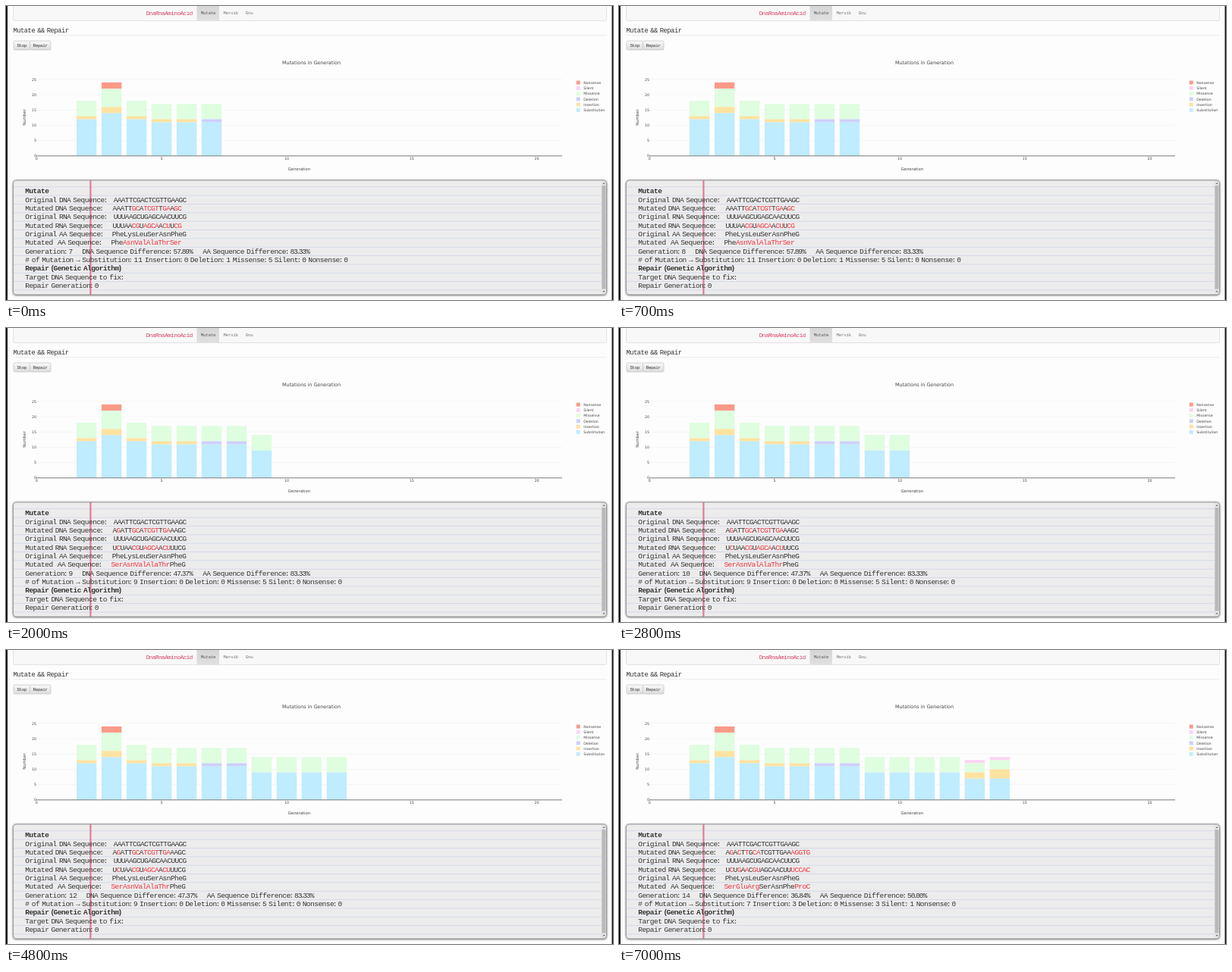
An HTML page that plays this animation: 800x388 px, repeating every 7.1 s.

```html
<!DOCTYPE html>
<html lang="en">
<head>
<meta charset="utf-8">
<title>Mutate and Repair</title>
<style>
html, body { margin: 0; width: 100%; height: 100%; overflow: hidden; background: #fdfdfd; }
svg { display: block; width: 800px; height: 388px; }
text { white-space: pre; }
.type { font-family: "Liberation Mono", monospace; text-anchor: middle; }
.plot { font-family: "DejaVu Sans", sans-serif; fill: #444; }
.red { fill: #f0323c; }
</style>
</head>
<body>
<svg id="stage" viewBox="0 0 800 388">
  <defs>
    <linearGradient id="button" x2="0" y2="1">
      <stop stop-color="#fafafa"/><stop offset="1" stop-color="#dcdcdc"/>
    </linearGradient>
    <linearGradient id="tab" x2="0" y2="1">
      <stop stop-color="#d6d6d6"/><stop offset="1" stop-color="#e0e0e0"/>
    </linearGradient>
    <filter id="shadow" x="-2%" y="-6%" width="104%" height="112%">
      <feDropShadow dx="0" dy="0.5" stdDeviation="1.6" flood-color="#000" flood-opacity=".75"/>
    </filter>
    <clipPath id="sheet"><rect x="9.5" y="230" width="782" height="151" rx="4"/></clipPath>
  </defs>
  <rect width="800" height="388" fill="#fdfdfd"/>
  <rect width="2" height="388" fill="#111"/>
  <rect x="798.5" width="1.5" height="388" fill="#111"/>

  <rect x="9.5" y="-5" width="782" height="24.5" rx="2" fill="#f8f8f8" stroke="#e2e2e2"/>
  <rect x="251.5" width="29.5" height="19" fill="url(#tab)"/>
  <rect x="9.5" y="38.3" width="782" height="1" fill="#ebebeb"/>
  <g fill="url(#button)" stroke="#c8c8c8" stroke-width=".8">
    <rect x="10" y="46" width="21.5" height="12" rx="1.5"/>
    <rect x="31.5" y="46" width="27.5" height="12" rx="1.5"/>
  </g>
  <g id="labels"></g>
  <g id="chart"></g>

  <rect x="9.5" y="230" width="782" height="151" rx="4" fill="#ececec" filter="url(#shadow)"/>
  <g clip-path="url(#sheet)">
    <g id="rules"></g>
    <rect x="110.3" y="230" width="2.2" height="151" fill="#df7d95"/>
    <rect x="784.6" y="230" width="7" height="151" fill="#e4e4e4"/>
    <rect x="785.3" y="237" width="5.2" height="136.5" fill="#b9b9b9"/>
    <path d="M786.3 235l1.7-2 1.7 2zM786.3 376l1.7 2 1.7-2z" fill="#777"/>
  </g>
  <rect x="9.5" y="230" width="782" height="151" rx="4" fill="none" stroke="#8a8a8a" stroke-width=".8"/>
  <g id="report"></g>
</svg>
<script>
const LOOP = 7100;
const FIRST = 7;
const CHANGES = [700, 1800, 2700, 3800, 4800, 5800, 6800];

const byId = id => document.getElementById(id);

function add(parent, tag, attrs = {}, text) {
  const node = document.createElementNS('http://www.w3.org/2000/svg', tag);
  for (const key in attrs) node.setAttribute(key, attrs[key]);
  if (text !== undefined) node.textContent = text;
  parent.appendChild(node);
  return node;
}

// Glyph advances of the typewriter face, at body size 9.5
function advance(ch) {
  if (ch === ' ') return 3.2;
  if (ch === ':') return 2.5;
  if (ch === '.') return 2;
  if (ch === '1') return 5.6;
  if ('()'.includes(ch)) return 3;
  if (/[0-9]/.test(ch)) return 4.6;
  return /[A-Z]/.test(ch) ? 5.05 : 5.2;
}

// Letters that differ from base at the same place become red
function type(parent, text, x, y, { size = 9.5, fill = '#333', bold, base } = {}) {
  const scale = size / 9.5;
  const centres = [...text].map(ch => {
    const w = advance(ch) * scale;
    x += w;
    return (x - w / 2).toFixed(2);
  });
  const node = add(parent, 'text', {
    class: 'type', x: centres.join(' '), y, fill,
    'font-size': size, 'font-weight': bold ? 700 : 400
  });
  if (!base) {
    node.textContent = text;
    return;
  }
  [...text].forEach((ch, i) => add(node, 'tspan', ch === base[i] ? {} : { class: 'red' }, ch));
}

function drawLabels() {
  const g = byId('labels');
  type(g, 'DnaRnaAminoAcid', 185, 11.6, { size: 7.5, fill: '#d63f62' });
  type(g, 'Mutate', 257, 11.2, { size: 5.9, fill: '#555' });
  type(g, 'Mervik', 286.8, 11.2, { size: 5.9, fill: '#777' });
  type(g, 'Gnu', 316, 11.2, { size: 5.9, fill: '#777' });
  type(g, 'Mutate && Repair', 9.7, 35.4, { size: 8.8 });
  type(g, 'Stop', 14.6, 53.7, { size: 5.8 });
  type(g, 'Repair', 35.8, 53.7, { size: 5.8 });
}

const SERIES = [
  ['Substitution', '#bfecfe'],
  ['Insertion', '#fee2a0'],
  ['Deletion', '#cdcffc'],
  ['Missense', '#dffddf'],
  ['Silent', '#fbd4f5'],
  ['Nonsense', '#fa9a88']
];
const UNIT = 4.035;
const FLOOR = 197.7;
const xAt = n => 40.2 + 32.97 * n;
const yAt = n => FLOOR - UNIT * n;

// Counts per generation from 2 on, in the order of SERIES
const COUNTS = [
  [12, 1, 0, 5], [14, 2, 0, 6, 0, 2], [12, 1, 0, 5],
  ...Array(2).fill([11, 1, 0, 5]),
  ...Array(2).fill([11, 0, 1, 5]),
  ...Array(4).fill([9, 0, 0, 5]),
  [7, 2, 0, 3, 1], [7, 3, 0, 3, 1]
];

function drawChart() {
  const g = byId('chart');
  const label = (text, x, y, size, anchor = 'middle', more = {}) =>
    add(g, 'text', { class: 'plot', x, y, 'font-size': size, 'text-anchor': anchor, ...more }, text);

  label('Mutations in Generation', 402.5, 77, 6.38);
  label('Generation', 386.3, 217.3, 5.3);
  label('Number', 26, 147, 5.3, 'middle', { transform: 'rotate(-90 26 147)' });
  for (let n = 0; n <= 25; n += 5) {
    if (n) add(g, 'rect', { x: 40, y: yAt(n) - .3, width: 693, height: .6, fill: '#f0f0f0' });
    label(n, 40, yAt(n) + 1.7, 4.75, 'end');
  }
  for (let n = 0; n <= 20; n += 5) label(n, xAt(n), 203.3, 4.75);

  const bars = COUNTS.map((counts, i) => {
    const bar = add(g, 'g');
    let sum = 0;
    counts.forEach((count, s) => {
      sum += count;
      if (count) add(bar, 'rect', {
        x: xAt(i + 2) - 13.2, y: yAt(sum), width: 26.4, height: count * UNIT, fill: SERIES[s][1]
      });
    });
    return bar;
  });
  add(g, 'rect', { x: 40, y: 197.4, width: 693, height: .9, fill: '#6c6c6c' });

  SERIES.forEach(([name, fill], i) => {
    const y = 137.3 - 7.25 * i;
    add(g, 'rect', { x: 751.7, y: y - 2.5, width: 5, height: 5, fill });
    label(name, 761.3, y + 1.7, 4.65, 'start');
  });
  return bars;
}

const DNA = 'AAATTCGACTCGTTGAAGC';
const AMINO = 'PheLysLeuSerAsnPheG';
const PAIR = { A: 'U', T: 'A', G: 'C', C: 'G' };
const toRna = dna => [...dna].map(ch => PAIR[ch]).join('');

// Each state holds from its generation on
const STATES = [
  { from: 7, dna: 'AAATTGCATCGTTGAAGC', amino: 'PheAsnValAlaThrSer', gap: '57.89', aminoGap: '83.33' },
  { from: 9, dna: 'AGATTGCATCGTTGAAAGC', amino: 'SerAsnValAlaThrPheG', gap: '47.37', aminoGap: '83.33' },
  { from: 13, dna: 'AGACTTGCATCGTTGAAAGTC', amino: 'SerGluArgSerAsnPheGln', gap: '36.84', aminoGap: '50.00' },
  { from: 14, dna: 'AGACTTGCATCGTTGAAAGGTG', amino: 'SerGluArgSerAsnPheProC', gap: '36.84', aminoGap: '50.00' }
];

const LEFT = 25.6;
const rowY = i => 247.2 + 11.35 * i;

function drawReport(gen) {
  const g = byId('report');
  g.replaceChildren();
  const s = STATES.filter(state => state.from <= gen).pop();
  const counts = COUNTS[gen - 2];
  const line = (row, text, bold) => type(g, text, LEFT, rowY(row), { bold });
  const value = (row, text, x, base) => type(g, text, x, rowY(row), { base });

  line(0, 'Mutate', true);
  [['DNA', DNA, s.dna, 142], ['RNA', toRna(DNA), toRna(s.dna), 142], ['AA', AMINO, s.amino, 140]]
    .forEach(([name, before, after, x], i) => {
      line(1 + 2 * i, `Original ${name} Sequence:`);
      value(1 + 2 * i, before, x);
      line(2 + 2 * i, `Mutated ${name === 'AA' ? ' AA' : name} Sequence:`);
      value(2 + 2 * i, after, x - 1.2, before);
    });
  line(7, `Generation: ${gen}    DNA Sequence Difference: ${s.gap}%    AA Sequence Difference: ${s.aminoGap}%`);
  const tally = SERIES.map(([name], i) => `${name}: ${counts[i] || 0}`).join(' ');
  line(8, `# of Mutation → ${tally}`);
  line(9, 'Repair (Genetic Algorithm)', true);
  line(10, 'Target DNA Sequence to fix:');
  line(11, 'Repair Generation: 0');
}

drawLabels();
const bars = drawChart();
for (let y = 238.3; y < 381; y += 11.35)
  add(byId('rules'), 'rect', { x: 9.5, y, width: 776, height: .9, fill: '#d3d9ec' });

let shown = 0;
function tick() {
  const t = performance.now() % LOOP;
  const gen = FIRST + CHANGES.filter(at => at <= t).length;
  if (gen !== shown) {
    shown = gen;
    bars.forEach((bar, i) => bar.setAttribute('visibility', i + 2 <= gen ? 'visible' : 'hidden'));
    drawReport(gen);
  }
  requestAnimationFrame(tick);
}
tick();
</script>
</body>
</html>
```
